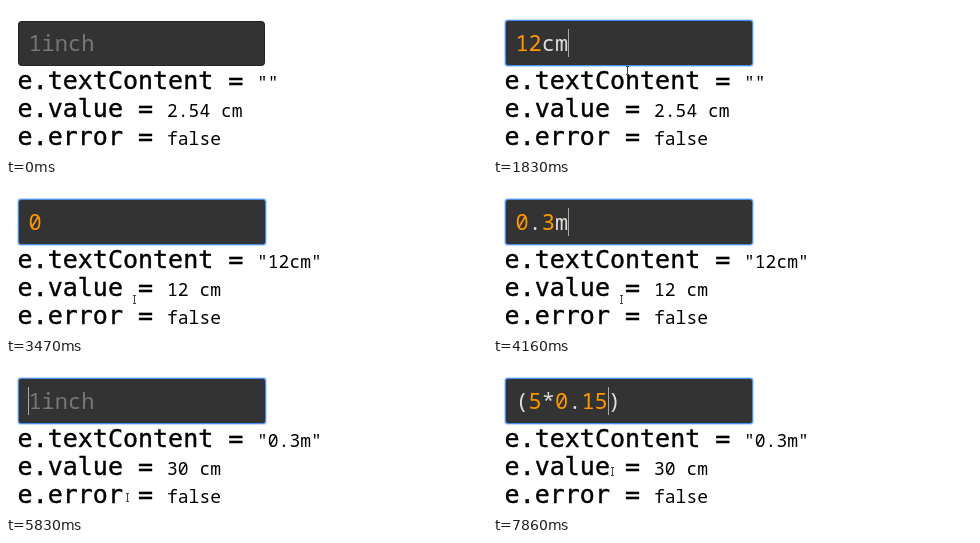
Recreate the animation shown at these times as an HTML page with a canvas. Size 481 by 151 pixels, loop 8000 ms.

```html
<!DOCTYPE html>
<html lang="en">
<head>
<meta charset="utf-8">
<title>Unit input</title>
<style>
html, body { margin: 0; width: 100%; height: 100%; overflow: hidden; background: #fff; }
canvas { display: block; }
</style>
</head>
<body>
<canvas id="stage" width="481" height="151"></canvas>
<script>
const ctx = document.getElementById('stage').getContext('2d');
const LOOP = 8000;
const KEY_GAP = 90;
const CARET_ON = 330, CARET_OFF = 220;
const CELL = 13.2, TEXT_X = 22.4;
const LABEL_FONT = '25px "DejaVu Sans Mono", monospace';
const VALUE_FONT = '500 18px "Noto Sans Mono", monospace';
const INPUT_FONT = '500 22px "Noto Sans Mono", monospace';
const HINT_FONT = '22px "Noto Sans Mono", monospace';

// Each visit to the field: click, clear, type bursts of keys, commit.
// caretDelay is the time until the caret returns after a key.
const visits = [
  { focus: 410, clear: 410, commit: 1880, value: '12 cm', bursts: [
    { start: 1050, keys: '12' }, { start: 1430, keys: 'cm' }] },
  { focus: 2460, clear: 2780, commit: 4510, value: '30 cm', bursts: [
    { start: 3470, keys: '0.', caretDelay: 70 }, { start: 3700, keys: '3' }, { start: 4160, keys: 'm' }] },
  { focus: 5390, clear: 5830, commit: LOOP, bursts: [
    { start: 6520, keys: '(', caretDelay: 300 }, { start: 6820, keys: '5', caretDelay: 400 },
    { start: 7200, keys: '*' }, { start: 7380, keys: '0' }, { start: 7670, keys: '.15' }] }
];

// Pointer moves: start, end, then the place reached.
const START = { x: 252, y: 115 };
const moves = [
  [190, 410, 128, 42], [500, 580, 132, 60], [1880, 1950, 129, 82],
  [2110, 2170, 122, 31], [2460, 2850, 126, 110], [5050, 5070, 122, 94],
  [5170, 5320, 122, 38], [5390, 5640, 119, 129], [5830, 6140, 117, 103]
];

function stateAt(t) {
  const state = { text: '', tail: '', content: '', value: '2.54 cm', focused: false, caret: false };
  for (const { focus, clear, commit, value, bursts } of visits) {
    if (t < focus) break;
    let event = focus, delay = 0;
    if (t >= clear) {
      event = clear;
      state.text = state.tail = '';
    }
    for (const { start, keys, caretDelay = 0 } of bursts) {
      [...keys].forEach((key, i) => {
        const time = start + i * KEY_GAP;
        if (t < time) return;
        event = time;
        delay = caretDelay;
        state.text += key;
        if (key === '(') state.tail = ')';
      });
    }
    state.focused = t < commit;
    const idle = t - event;
    state.caret = state.focused && idle >= delay && idle % (CARET_ON + CARET_OFF) < CARET_ON;
    if (t >= commit) {
      state.content = state.text;
      state.value = value;
    }
  }
  return state;
}

function pointerAt(t) {
  let { x, y } = START;
  for (const [start, end, toX, toY] of moves) {
    const p = Math.min(1, Math.max(0, (t - start) / (end - start)));
    x += (toX - x) * p;
    y += (toY - y) * p;
  }
  return [Math.round(x), Math.round(y)];
}

function write(text, x, y, font, color) {
  ctx.font = font;
  ctx.fillStyle = color;
  ctx.fillText(text, x, y);
}

function box(x, y, w, h, radius, color) {
  ctx.fillStyle = color;
  ctx.beginPath();
  ctx.roundRect(x, y, w, h, radius);
  ctx.fill();
}

function drawInput({ text, tail, focused, caret }) {
  if (focused) {
    box(11, 13, 250, 48, 4, '#c5daf9');
    box(12, 14, 248, 46, 3, '#4a8df0');
    box(13, 15, 246, 44, 2, '#333');
  } else {
    box(12, 15, 247, 45, 4, '#222');
    box(13, 16, 245, 43, 3, '#333');
  }
  if (!text) write('1inch', TEXT_X, 45, HINT_FONT, '#777');
  [...text + tail].forEach((char, i) => {
    write(char, TEXT_X + i * CELL, 45, INPUT_FONT, /\d/.test(char) ? '#ff9800' : '#ddd');
  });
  if (caret) {
    ctx.fillStyle = '#aaa';
    ctx.fillRect(Math.round(TEXT_X + text.length * CELL), 23, 1, 28);
  }
}

function drawReadings({ content, value }) {
  const rows = [['textContent', `"${content}"`], ['value', value], ['error', 'false']];
  rows.forEach(([name, result], i) => {
    const label = `e.${name} = `, y = 83 + i * 28;
    write(label, 11.6, y, LABEL_FONT, '#000');
    ctx.lineWidth = 0.4;
    ctx.strokeText(label, 11.6, y);
    write(result, 11 + label.length * 15, y, VALUE_FONT, '#000');
  });
}

function drawPointer([x, y]) {
  // Over the dark field only the top serif stands out.
  if (y > 13 && y < 58) {
    ctx.fillStyle = '#ddd';
    ctx.fillRect(x, y, 4, 1);
    return;
  }
  ctx.fillStyle = '#444';
  ctx.fillRect(x + 2, y, 1, 9);
  ctx.fillRect(x + 1, y, 3, 1);
  ctx.fillRect(x + 1, y + 8, 3, 1);
}

function draw(now) {
  const t = now % LOOP;
  const state = stateAt(t);
  ctx.fillStyle = '#fff';
  ctx.fillRect(0, 0, 481, 151);
  drawInput(state);
  drawReadings(state);
  if (t >= 40) drawPointer(pointerAt(t));
  requestAnimationFrame(draw);
}
requestAnimationFrame(draw);
</script>
</body>
</html>
```
